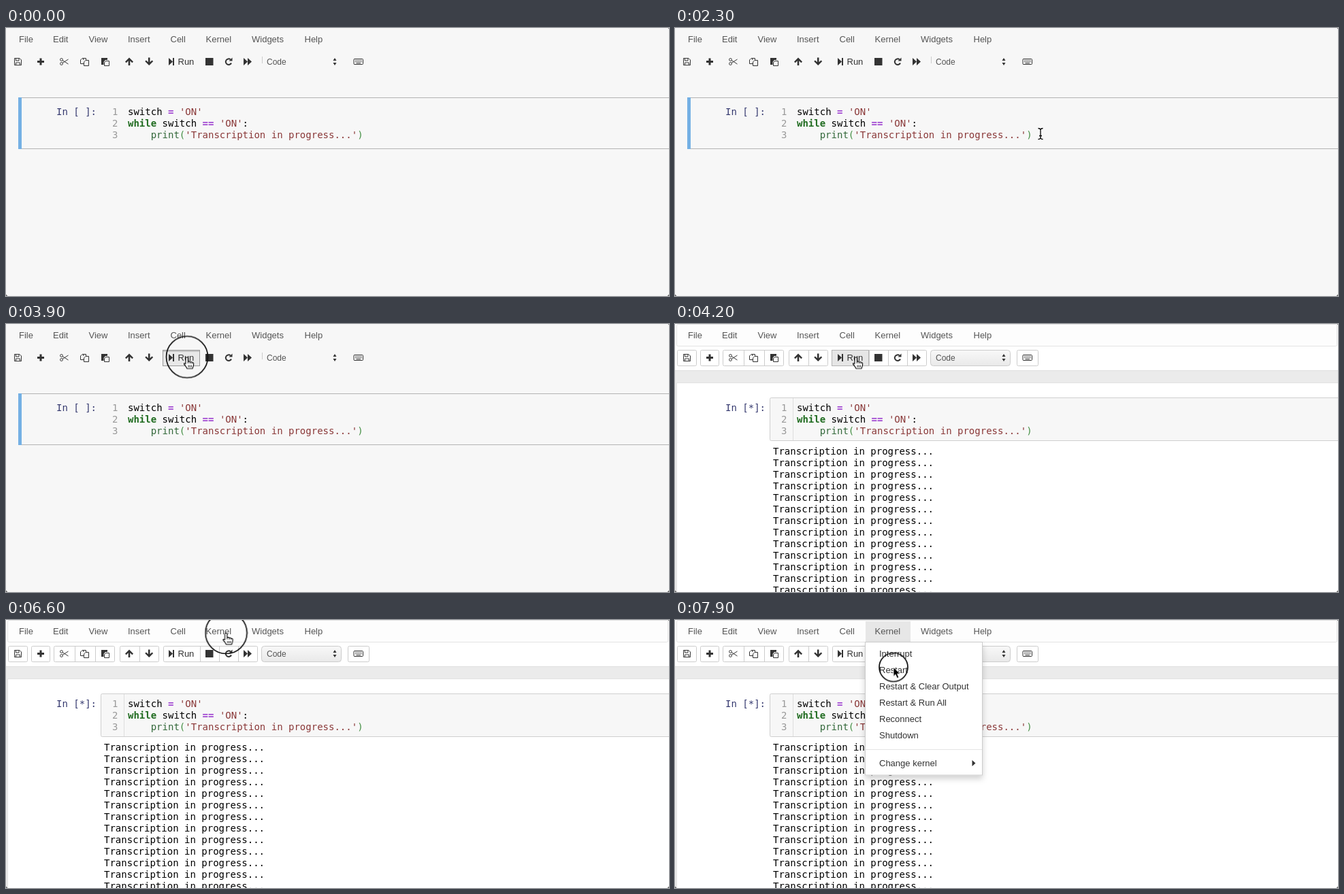
Recreate the animation shown at these times as an HTML page. Size 974 by 394 pixels, loop 8 s.

```html
<!DOCTYPE html>
<html lang="en">
<head>
<meta charset="utf-8">
<title>Notebook kernel</title>
<style>
  html, body { margin: 0; height: 100%; overflow: hidden; background: #f7f7f7; }
  svg { display: block; width: 100%; height: 100%; }
  text { white-space: pre; }

  .ui { font: 13px "Liberation Sans", Arial, sans-serif; fill: #555; }
  .ui .dark { fill: #333; }
  .code { font: 14px "DejaVu Sans Mono", monospace; fill: #000; }
  .prompt { fill: #35396f; }
  .num { fill: #999; }
  .kw { fill: #1f6b1f; font-weight: bold; }
  .fn { fill: #33683a; }
  .op { fill: #9d3fd0; font-weight: bold; }
  .str { fill: #8a3838; }
  .par { fill: #459045; }
  .icons { fill: #333; }
  .line { fill: none; stroke: #333; }
  .btn { fill: #fff; stroke: #ccc; }

  .before, .after, .output, .hover, .press, .menu, .arrow, .beam, .hand, .click, .cursor {
    animation: 8s step-end -5ms infinite;
  }
  .before { animation-name: before; }
  .after { animation-name: after; }
  .output { animation-name: output; }
  .hover { animation-name: hover; }
  .press { animation-name: press; }
  .menu { animation-name: menu; }
  .arrow { animation-name: arrow; }
  .beam { animation-name: beam; }
  .hand { animation-name: hand; }
  .click { animation-name: click; }
  .cursor { animation-name: move; animation-timing-function: ease-in-out; }

  @keyframes before { 0% { opacity: 1 } 50%, 100% { opacity: 0 } }
  @keyframes after { 0% { opacity: 0 } 50%, 100% { opacity: 1 } }
  @keyframes output { 0% { opacity: 0 } 51.25%, 100% { opacity: 1 } }
  @keyframes hover { 0% { opacity: 0 } 46.25% { opacity: 1 } 77.5%, 100% { opacity: 0 } }
  @keyframes press { 0% { opacity: 0 } 47.5% { opacity: 1 } 50%, 100% { opacity: 0 } }
  @keyframes menu { 0% { opacity: 0 } 83.75%, 100% { opacity: 1 } }
  @keyframes arrow {
    0% { opacity: 0 } 1.25% { opacity: 1 } 17.5% { opacity: 0 } 41.25% { opacity: 1 }
    46.25% { opacity: 0 } 77.5% { opacity: 1 } 78.75% { opacity: 0 } 91.25%, 100% { opacity: 1 }
  }
  @keyframes beam { 0% { opacity: 0 } 17.5% { opacity: 1 } 41.25%, 100% { opacity: 0 } }
  @keyframes hand {
    0% { opacity: 0 } 46.25% { opacity: 1 } 77.5% { opacity: 0 } 78.75% { opacity: 1 } 91.25%, 100% { opacity: 0 }
  }
  @keyframes click {
    0% { r: 0 } 47.5% { r: 21px } 48.75% { r: 30.5px } 50% { r: 21px } 51.25% { r: 0 }
    82.5% { r: 30.5px } 83.75% { r: 21px } 85% { r: 0 } 98.75%, 100% { r: 21px }
  }
  @keyframes move {
    0%, 1.25% { transform: translate(470px, 368px); animation-timing-function: linear }
    11.25% { transform: translate(505px, 292px); animation-timing-function: ease-out }
    18.75%, 35% { transform: translate(537px, 155px) }
    47.5%, 73.75% { transform: translate(266px, 48.5px) }
    75% { transform: translate(268.5px, 48.5px) }
    80%, 87.5% { transform: translate(323.5px, 19px) }
    98.75%, 100% { transform: translate(321px, 69.5px) }
  }
</style>
</head>
<body>
<svg viewBox="0 0 974 394">
  <defs>
    <filter id="shadow" x="-10%" y="-10%" width="120%" height="125%">
      <feDropShadow dx="0" dy="5" stdDeviation="4" flood-opacity=".18"/>
    </filter>
    <linearGradient id="select" x2="0" y2="1">
      <stop stop-color="#f8f8f8"/><stop offset="1" stop-color="#e9e9e9"/>
    </linearGradient>
  </defs>

  <g class="before">
    <rect width="974" height="394" fill="#f7f7f7"/>
    <rect x="18.5" y="102.5" width="970" height="75" fill="none" stroke="#b4b4b4"/>
    <rect x="18" y="102" width="5" height="76" fill="#74b0e4"/>
    <path d="M376.500 42V52" stroke="#ccc"/>
  </g>

  <g class="after">
    <rect width="974" height="394" fill="#fff"/>
    <rect x="2.500" y=".5" width="970" height="32" rx="2" fill="#fdfdfd" stroke="#e4e4e4"/>
    <rect y="68" width="974" height="326" fill="#ebebeb"/>
    <path d="M0 68.500H974" stroke="#e0e0e0"/>
    <rect x="2.500" y="86.500" width="990" height="330" fill="#fff" stroke="#e2e2e2"/>
    <g id="buttons"></g>
    <rect x="375.500" y="38.500" width="117" height="23" rx="4" fill="url(#select)" stroke="#ccc"/>
    <rect x="139.500" y="108.500" width="850" height="63" rx="2" fill="#f7f7f7" stroke="#cfcfcf"/>
    <path d="M173.500 109V171" stroke="#ddd"/>
  </g>

  <rect class="hover" x="230.500" y="38.500" width="54" height="23" fill="#e6e6e6" stroke="#b4b4b4"/>
  <g class="press">
    <rect x="230.500" y="38.500" width="54" height="23" fill="#e8e8e8" stroke="#999"/>
    <path d="M231 40H284" stroke="#c4c4c4" stroke-width="2"/>
  </g>
  <rect class="menu" x="280" y="2" width="66" height="30" fill="#e7e7e7"/>

  <g class="ui" id="bar">
    <text class="dark" x="252.500" y="54">Run</text>
    <text x="383" y="53.500" font-size="12">Code</text>
  </g>

  <g class="icons">
    <path class="line" d="M12.500 44.500H20L22.500 47V54.500H12.500ZM14.500 44.500V48H19V44.500M14.500 54V51H20.500V54"/>
    <path d="M49.500 44.500h3v3.500h3.500v3h-3.500v3.500h-3v-3.500h-3.500v-3h3.500z"/>
    <g class="line">
      <circle cx="81.500" cy="46.500" r="1.900"/><circle cx="81.500" cy="52.500" r="1.900"/>
      <path d="M83 47.500L91.500 53M83 51.500L91.500 46"/>
    </g>
    <path class="line" d="M113.500 47V44.500H117.500V47M109.500 52.500V47L112 44.500H114M109.500 52.500H114M114.500 55.500V50L117 47.500H121.500V55.500Z"/>
    <path d="M140 44H149V47H146L143.500 50V54H140Z"/>
    <path class="line" d="M144.500 55.500V50.500L147 48.500H151.500V55.500Z"/>
    <path id="up" d="M181 43.500L187 49.500L185.300 51.200L182.300 48.300V55H179.700V48.300L176.700 51.200L175 49.500Z"/>
    <use href="#up" transform="rotate(180 195.600 49.300)"/>
    <path d="M239 44L245 49.500L239 55ZM245 44H247V55H245Z"/>
    <rect x="293" y="44" width="11.500" height="11"/>
    <path class="line" stroke-width="2" d="M331 51.500A4.300 4.300 0 1 1 329.800 46.300"/>
    <path d="M332.500 43.500V48.500H327.500Z"/>
    <path d="M349 44L355 49.500V44L361 49.500L355 55V49.500L349 55Z"/>
    <path d="M480.500 48L483 44L485.500 48ZM480.500 51H485.500L483 55Z"/>
    <rect class="line" x="511" y="45.500" width="13.500" height="8" rx="1"/>
    <path class="line" stroke-dasharray="1.300 .8" d="M513 47.700H523M513 49.600H523"/>
    <path class="line" d="M514.500 51.700H521"/>
  </g>

  <g class="code">
    <text class="prompt before" x="74" y="127.500">In [ ]:</text>
    <text class="prompt after" x="74" y="127.500">In [*]:</text>
    <text class="num" x="156" y="127.500">1</text>
    <text class="num" x="156" y="144.500">2</text>
    <text class="num" x="156" y="161.500">3</text>
    <text x="179" y="127.500">switch <tspan class="op">=</tspan> <tspan class="str">'ON'</tspan></text>
    <text x="179" y="144.500"><tspan class="kw">while</tspan> switch <tspan class="op">==</tspan> <tspan class="str">'ON'</tspan>:</text>
    <text x="212.700" y="161.500"><tspan class="fn">print</tspan><tspan class="par">(</tspan><tspan class="str">'Transcription in progress...'</tspan><tspan class="par">)</tspan></text>
    <g class="output" id="output"></g>
  </g>

  <g class="menu">
    <rect x="279.500" y="32.500" width="172" height="195.500" fill="#fff" stroke="#ccc" filter="url(#shadow)"/>
    <path d="M280 190.500H451" stroke="#e5e5e5"/>
    <path d="M436.500 206L441.500 210.500L436.500 215Z" fill="#333"/>
    <g class="ui" id="items"></g>
  </g>

  <path d="M0 391.500V394H2.500ZM974 391.500V394H971.500ZM972.500 0H974V1.500Z" fill="#666"/>

  <g class="cursor">
    <circle class="click" r="0" fill="none" stroke="#111" stroke-width="1.700"/>
    <path class="arrow" d="M0 0V13.500L3 10.600L5.300 16L7.800 15L5.500 9.700H9.700Z" fill="#000" stroke="#fff" stroke-width=".8"/>
    <g class="beam" fill="none">
      <path id="beam" d="M-3.500 -7.500Q0 -7.500 0 -5V6Q0 8.500 -3.500 8.500M3.500 -7.500Q0 -7.500 0 -5M0 6Q0 8.500 3.500 8.500M-2 3.500H2" stroke="#fff" stroke-width="2.600"/>
      <use href="#beam"/>
      <path d="M-3.500 -7.500Q0 -7.500 0 -5V6Q0 8.500 -3.500 8.500M3.500 -7.500Q0 -7.500 0 -5M0 6Q0 8.500 3.500 8.500M-2 3.500H2" stroke="#000" stroke-width="1.300"/>
    </g>
    <g class="hand" stroke="#000" stroke-width="1.100" stroke-linejoin="round">
      <path fill="#fff" d="M-2 10V2Q-2 .2 -.3 .2T1.400 2V7Q3 5.600 4.400 7.400Q6 6.400 7.200 8.200Q9.700 7.600 9.700 10.300Q9.700 13 8 17H0Q-1.500 13.500 -4.500 10.500Q-4.800 8.200 -2 10Z"/>
      <path d="M1.400 7V9.500M4.400 7.400V9.800M7.200 8.200V10M2 12V15M4.200 12V15M6.400 12V15" stroke-width=".9"/>
    </g>
  </g>
</svg>
<script>
  const byId = id => document.getElementById(id);

  function add(parent, tag, attrs, content = "") {
    const node = document.createElementNS("http://www.w3.org/2000/svg", tag);
    for (const key in attrs) node.setAttribute(key, attrs[key]);
    node.textContent = content;
    byId(parent).append(node);
  }

  const menuBar = { File: 19, Edit: 69, View: 121.500, Insert: 179, Cell: 241.500, Kernel: 293.500, Widgets: 361, Help: 438.500 };
  for (const [label, x] of Object.entries(menuBar)) add("bar", "text", { x, y: 21 }, label);

  const buttonGroups = [[3, 32], [37, 65], [70, 101, 131, 160], [167, 196, 225], [231, 285, 313, 341, 370], [502, 534]];
  for (const edges of buttonGroups) {
    const left = edges[0], right = edges.at(-1);
    add("buttons", "rect", { class: "btn", x: left + .5, y: 38.500, width: right - left - 1, height: 23, rx: 2 });
    for (const x of edges.slice(1, -1)) add("buttons", "path", { class: "btn", d: `M${x + .5} 39V61` });
  }

  const kernelItems = ["Interrupt", "Restart", "Restart & Clear Output", "Restart & Run All", "Reconnect", "Shutdown"];
  kernelItems.forEach((label, i) => add("items", "text", { class: "dark", x: 300, y: 54 + 24 * i }, label));
  add("items", "text", { class: "dark", x: 300, y: 215 }, "Change kernel");

  for (let row = 0; row < 13; row++) {
    add("output", "text", { x: 144, y: 192 + 17 * row }, "Transcription in progress...");
  }
</script>
</body>
</html>
```
